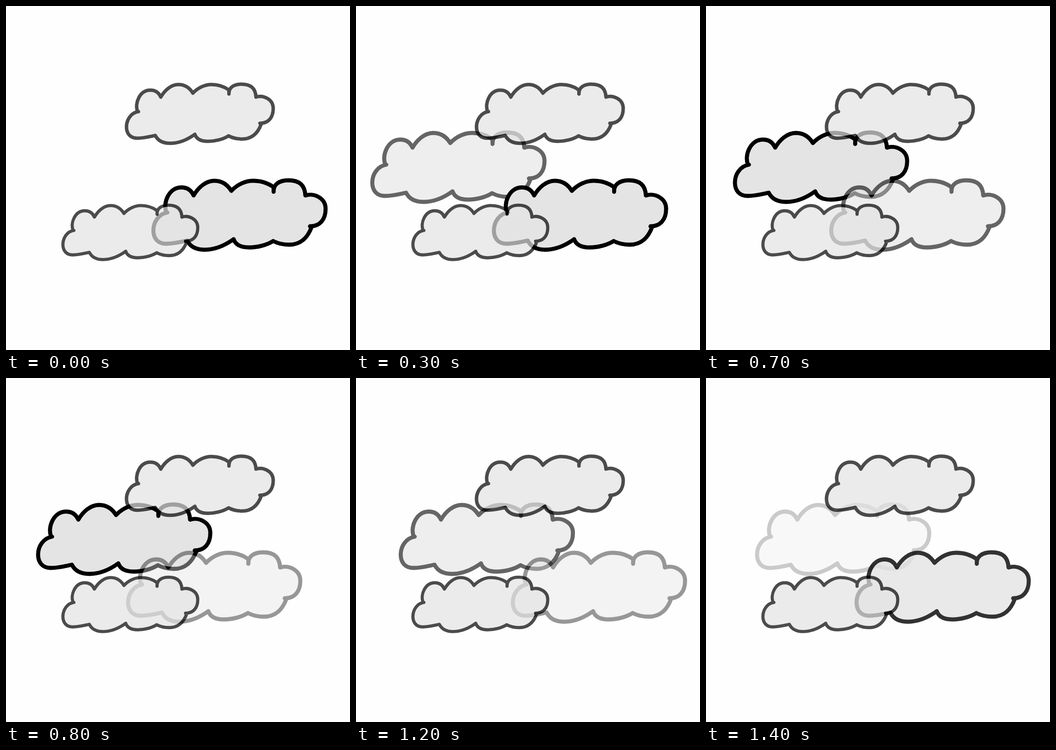
These frames come from a looping animation (748 by 748 pixels, 1.5 s). An HTML page:

```html
<!DOCTYPE html>
<html lang="en">
<head>
<meta charset="utf-8">
<title>Drifting clouds</title>
<style>
  html, body { margin: 0; width: 100%; height: 100%; overflow: hidden; background: #fefefe; }
  svg { display: block; width: 100vw; height: 100vh; }
</style>
</head>
<body>
<svg viewBox="0 0 748 748">
  <defs>
    <path id="cloud" fill="#e4e4e4" stroke="#000" stroke-width="8.8" stroke-linejoin="round" d="
      M31.5 73 C24 53 37 20 63.5 19.5 C77 19 86 26 91 37
      C101 20 117 5 136 5 C153 5 165 14 173 27
      C186 13 204 5 220 5 C239 5 254 11 265 19 L265 29
      C264 13 277 4 297 4 C321 4 333 15 334 37
      C352 31 378 42 378 66 C378 89 366 104 344 104 L347 107
      C339 128 324 144 299 144 C286 144 273 141 264 136
      C250 145 229 150 212 150 C194 150 182 144 178 132
      C160 145 138 155 115 155 C97 155 84 149 77 135
      C62 138 48 142 31 142 C13 142 3.5 130 3.5 113
      C3.5 95 15 77 34 74 Z"/>
  </defs>
  <g id="left"><use href="#cloud"/></g>
  <g id="right"><use href="#cloud"/></g>
  <g opacity=".7" transform="translate(259 166.5) scale(.852)"><use href="#cloud"/></g>
  <g opacity=".7" transform="translate(121 430) scale(.783)"><use href="#cloud"/></g>
</svg>
<script>
  const STEPS = 15, STEP_MS = 100, SPEED = 6.87, FADE = 5;
  const left = document.getElementById('left');
  const right = document.getElementById('right');

  // Fades in and out over the first and last FADE steps of its drift.
  function place(cloud, x, y, step) {
    cloud.setAttribute('transform', `translate(${x} ${y})`);
    cloud.setAttribute('opacity', Math.min(1, step / FADE, (STEPS - step) / FADE));
  }

  function draw(ms) {
    const step = Math.floor(ms / STEP_MS) % STEPS;
    const late = (step + 5) % STEPS;
    place(left, 11.3 + SPEED * step, 271, step);
    place(right, 351.3 - SPEED * late, 375, late);
  }

  const start = performance.now();
  function tick() {
    draw(performance.now() - start);
    requestAnimationFrame(tick);
  }
  tick();
</script>
</body>
</html>
```
